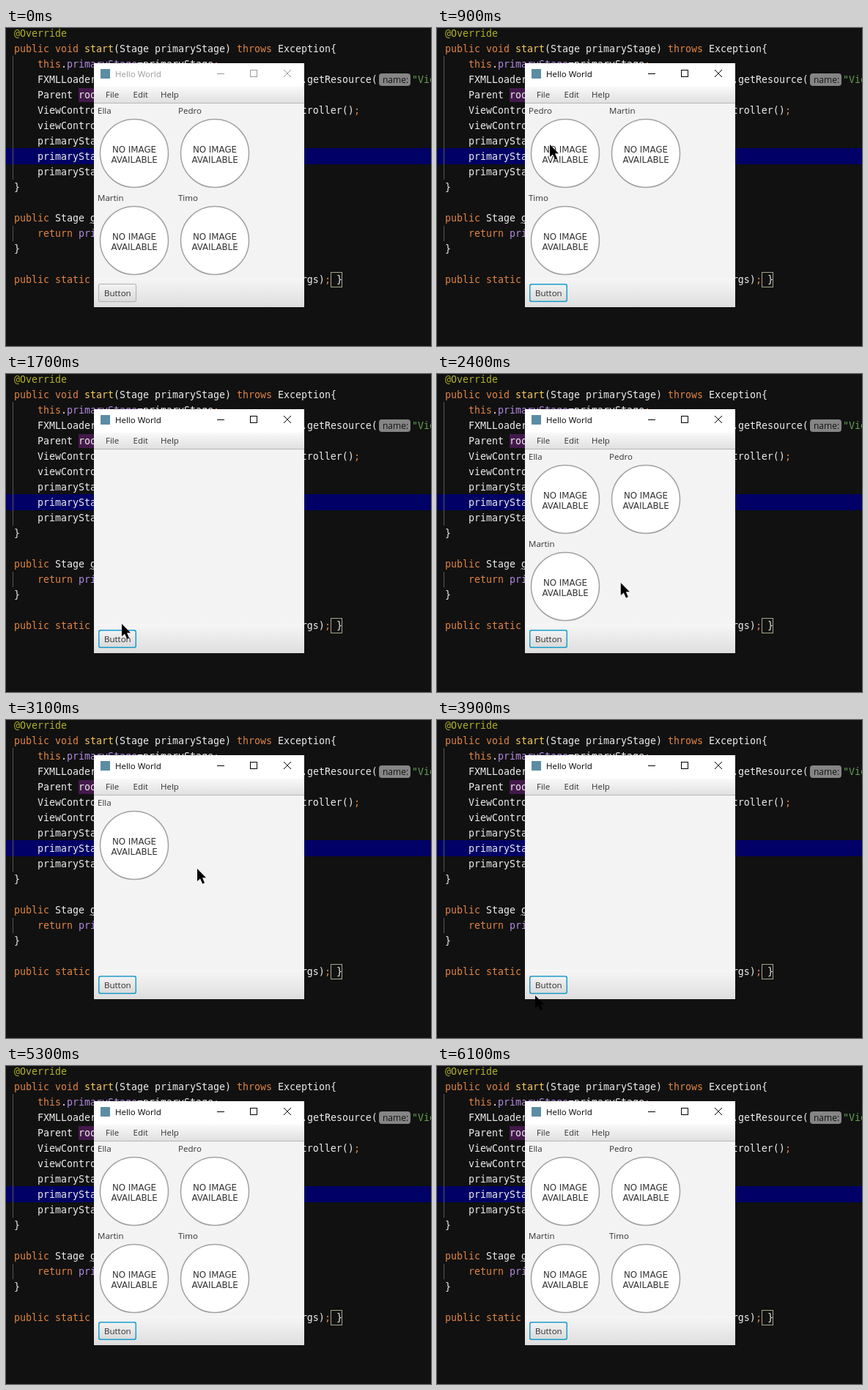
Recreate the animation shown at these times as an HTML page with a canvas. Size 580 by 434 pixels, loop 6300 ms.

```html
<!DOCTYPE html>
<html lang="en">
<head>
<meta charset="utf-8">
<title>Hello World</title>
<style>
html, body { margin: 0; width: 100%; height: 100%; overflow: hidden; background: #111; }
canvas { display: block; }
</style>
</head>
<body>
<canvas id="stage" width="580" height="434"></canvas>
<script>
const ctx = document.getElementById('stage').getContext('2d');
const LOOP = 6300, STEP = 100;
const CHAR = 8, ROW = 21, LEFT = 11;
const MONO = '13.29px "DejaVu Sans Mono", monospace';
const UI = '11.5px "Open Sans", sans-serif';
const BADGE = '11.8px "DejaVu Sans", sans-serif';

const CODE = `@Override
public void start(Stage primaryStage) throws Exception{
    this.primaryStage=primaryStage;
    FXMLLoader loader = new FXMLLoader(getClass().getResource(
    Parent root = loader.load();
    ViewController viewController = loader.getController();
    viewController.setMain(this);
    primaryStage.setTitle("Hello World");
    primaryStage.setScene(new Scene(root));
    primaryStage.show();
}

public Stage getPrimaryStage() {
    return primaryStage;
}

public static void main(String[] args) { launch(args); }`.split('\n');

const TOKEN = /(@\w+|\b(?:public|static|void|throws|return|this|new)\b|;|start(?=\()|(?<=this\.|return )primaryStage)/;
const tokenColor = (token, isPlain) =>
  isPlain ? '#ececec' :
  token[0] === '@' ? '#b0b028' :
  token === 'start' ? '#f6c95f' :
  token === 'primaryStage' ? '#b48ae2' : '#e08444';

const PEOPLE = ['Ella', 'Pedro', 'Martin', 'Timo'];
const FIRST_CLICK = 800, REFILL = 1900, SECOND_ROUND = 2300, LAST_REFILL = 4200;

// Pointer stops: arrival time, x, y
const STOPS = [
  [200, 430, 230], [700, 154, 159], [1400, 154, 159], [1700, 158, 341],
  [REFILL, 158, 354], [SECOND_ROUND, 272, 285], [2650, 165, 285], [3100, 261, 203],
  [3350, 172, 180], [3900, 134, 376], [LAST_REFILL, 150, 360], [4600, 380, 90], [4800, 440, 20]
];

function rect(x, y, w, h, fill) {
  ctx.fillStyle = fill;
  ctx.fillRect(x, y, w, h);
}

function text(str, x, y, font, fill, align = 'left') {
  ctx.font = font;
  ctx.fillStyle = fill;
  ctx.textAlign = align;
  ctx.fillText(str, x, y);
}

function line(color, ...points) {
  ctx.strokeStyle = color;
  ctx.lineWidth = 1;
  ctx.beginPath();
  points.forEach(([x, y]) => ctx.lineTo(x, y));
  ctx.stroke();
}

function roundBox(x, y, w, h, r, fill) {
  ctx.fillStyle = fill;
  ctx.beginPath();
  ctx.roundRect(x, y, w, h, r);
  ctx.fill();
}

function shade(top, bottom, from, to) {
  const g = ctx.createLinearGradient(0, top, 0, bottom);
  g.addColorStop(0, from);
  g.addColorStop(1, to);
  return g;
}

function drawCodeLine(source, row) {
  let x = LEFT;
  source.split(TOKEN).forEach((token, i) => {
    text(token, x, 12 + row * ROW, MONO, tokenColor(token, i % 2 === 0));
    x += token.length * CHAR;
  });
}

function drawEditor() {
  rect(0, 0, 580, 434, '#111');
  rect(0, 164, 580, 22, '#000066');
  rect(99, 82, 32, 19, '#43194a');
  rect(9, 38, 1, 169, '#555');
  rect(9, 270, 1, 21, '#555');
  CODE.forEach(drawCodeLine);
  roundBox(509, 62, 43, 17, 4, '#858585');
  text('name:', 514, 75, '500 12px "Open Sans", sans-serif', '#111');
  text('"View', 554, 75, MONO, '#62a050');
  line('#999', [114, 267], [116, 265], [118, 267], [120, 265]);
  ctx.strokeStyle = '#aaa48c';
  ctx.strokeRect(443.5, 333.5, 15, 20);
}

function drawWindow(active) {
  const ink = active ? '#000' : '#999';
  rect(120, 48, 287, 333, '#f3f3f3');
  rect(120, 48, 287, 32, '#fff');
  rect(120, 80, 287, 22, shade(80, 102, '#f9f9f9', '#e0e0e0'));
  rect(120, 102, 287, 1, '#b8b8b8');
  rect(120, 341, 287, 40, shade(341, 381, '#f6f6f6', '#dedede'));

  rect(129, 56, 13, 13, '#5c8ca3');
  text('Hello World', 149, 67, UI, ink);
  line(ink, [288, 62.5], [298, 62.5]);
  ctx.strokeRect(333.5, 57.5, 9, 9);
  line(ink, [379, 57], [389, 67]);
  line(ink, [389, 57], [379, 67]);
  ['File', 'Edit', 'Help'].forEach((label, i) => text(label, 136 + i * 37.5, 95, UI, '#333'));

  const edge = active ? 1.5 : 1;
  roundBox(126, 349, 52, 25, 3, active ? '#1c9dcc' : '#b0b0b0');
  roundBox(126 + edge, 349 + edge, 52 - 2 * edge, 25 - 2 * edge, 2, shade(350, 373, '#f3f3f3', '#dadada'));
  text('Button', 134, 366, UI, '#2a2a2a');
}

function drawPerson(name, slot) {
  ctx.save();
  ctx.translate(slot % 2 * 110, Math.floor(slot / 2) * 119);
  text(name, 125, 117, UI, '#333');
  ctx.beginPath();
  ctx.arc(175, 171, 46.5, 0, Math.PI * 2);
  ctx.fillStyle = '#fff';
  ctx.fill();
  ctx.strokeStyle = '#a2a2a2';
  ctx.lineWidth = 1.5;
  ctx.stroke();
  text('NO IMAGE', 175, 170, BADGE, '#333', 'center');
  text('AVAILABLE', 175, 184, BADGE, '#333', 'center');
  ctx.restore();
}

// Number of clicks made by time t in a steady series
const clicks = (t, first, gap) => Math.max(0, Math.min(PEOPLE.length, Math.floor((t - first) / gap) + 1));

// The first round removes from the front, the second from the back
function visiblePeople(t) {
  if (t < REFILL) return PEOPLE.slice(clicks(t, FIRST_CLICK, 200));
  if (t < LAST_REFILL) return PEOPLE.slice(0, PEOPLE.length - clicks(t, SECOND_ROUND, 350));
  return PEOPLE;
}

function drawPointer(t) {
  const next = STOPS.findIndex(stop => stop[0] > t);
  if (next < 1) return;
  const [t0, x0, y0] = STOPS[next - 1], [t1, x1, y1] = STOPS[next];
  const u = (t - t0) / (t1 - t0), ease = u * u * (3 - 2 * u);
  ctx.save();
  ctx.translate(x0 + (x1 - x0) * ease, y0 + (y1 - y0) * ease);
  ctx.fillStyle = '#000';
  ctx.fill(new Path2D('M0 0V17L4 13.5L7.2 20.5L10 19.2L7 12.3H12Z'));
  ctx.restore();
}

function draw(time) {
  const t = Math.floor(time % LOOP / STEP) * STEP;
  drawEditor();
  drawWindow(t >= FIRST_CLICK);
  visiblePeople(t).forEach(drawPerson);
  drawPointer(t);
}

const start = performance.now();
function tick() {
  draw(performance.now() - start);
  requestAnimationFrame(tick);
}
tick();
</script>
</body>
</html>
```
